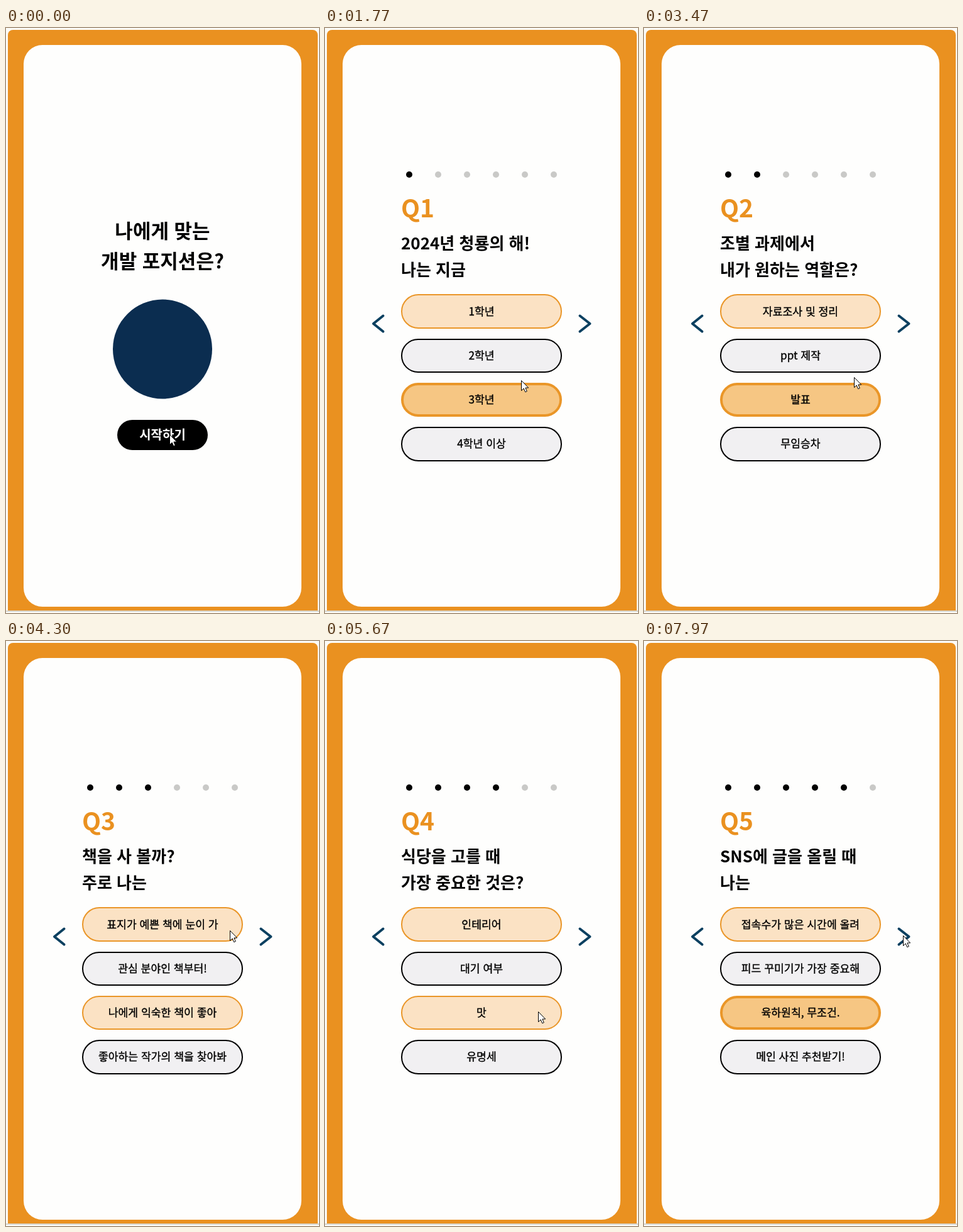
Recreate the animation shown at these times as an HTML page. Size 498 by 930 pixels, loop 8000 ms.

```html
<!DOCTYPE html>
<html lang="ko">
<head>
<meta charset="utf-8">
<title>개발 포지션 테스트</title>
<style>
  html, body { margin: 0; width: 100%; height: 100%; overflow: hidden; background: #fcfcf8; }
  svg { display: block; width: 498px; height: 930px; }
  text { font-family: "Noto Sans CJK KR", "Noto Sans", sans-serif; }
  .mid { text-anchor: middle; }
  .title { font-size: 31px; font-weight: 700; }
  .start { font-size: 20px; font-weight: 700; fill: #fff; }
  .number { font-size: 39px; font-weight: 700; fill: #ea9120; }
  .question { font-size: 26px; font-weight: 700; }
  .label { font-size: 17.2px; stroke: #000; stroke-width: .35px; }
  .arrow { fill: none; stroke: #0c4060; stroke-width: 4; stroke-linecap: round; stroke-linejoin: round; }
</style>
</head>
<body>
<svg viewBox="0 0 498 930">
  <path d="M3 926V11a8 8 0 0 1 8-8H488a8 8 0 0 1 8 8V926Z" fill="#ea9120"/>
  <rect y="926" width="498" height="2" fill="#d6d4cc"/>
  <rect x="28" y="27" width="442" height="893" rx="30" fill="#fefefd"/>
  <g id="intro">
    <text class="title mid" x="249" y="334">나에게 맞는</text>
    <text class="title mid" x="249" y="382">개발 포지션은?</text>
    <circle cx="249" cy="510.5" r="79" fill="#0b2d50"/>
    <rect x="177" y="623" width="144" height="48" rx="24"/>
    <text class="start mid" x="249" y="654">시작하기</text>
  </g>
  <g id="quiz">
    <g id="dots"></g>
    <text id="number" class="number" x="121" y="301"></text>
    <text class="question" x="121" y="352"></text>
    <text class="question" x="121" y="394"></text>
    <g id="options"></g>
    <path class="arrow" d="M92.5 457.5L77 470L92.5 482.5"/>
    <path class="arrow" d="M405.5 457.5L421.5 470L405.5 482.5"/>
  </g>
  <path id="cursor" d="M.5 .5V16.5L4.2 13L6.7 18.7L9.3 17.6L6.9 12H11.7Z" fill="#fff" stroke="#000"/>
</svg>
<script>
const LOOP = 8000;
const LAST_CLICK = 8070;
const PICK_SHARE = 0.48; // part of a page's time before its option is picked
const REST = 100;        // pause of the pointer around each click

// start: when the page appears; pick: chosen option; x: where it is clicked
const pages = [
  { start: 530, pick: 2, x: 275, question: ["2024년 청룡의 해!", "나는 지금"],
    options: ["1학년", "2학년", "3학년", "4학년 이상"] },
  { start: 2370, pick: 2, x: 300, question: ["조별 과제에서", "내가 원하는 역할은?"],
    options: ["자료조사 및 정리", "ppt 제작", "발표", "무임승차"] },
  { start: 3970, pick: 0, x: 313, question: ["책을 사 볼까?", "주로 나는"],
    options: ["표지가 예쁜 책에 눈이 가", "관심 분야인 책부터!", "나에게 익숙한 책이 좋아", "좋아하는 작가의 책을 찾아봐"] },
  { start: 5270, pick: 3, x: 294, question: ["식당을 고를 때", "가장 중요한 것은?"],
    options: ["인테리어", "대기 여부", "맛", "유명세"] },
  { start: 6770, pick: 2, x: 300, question: ["SNS에 글을 올릴 때", "나는"],
    options: ["접속수가 많은 시간에 올려", "피드 꾸미기가 가장 중요해", "육하원칙, 무조건.", "메인 사진 추천받기!"] },
];

const tones = [
  { fill: "#fbe2c4", picked: "#f6c683", stroke: "#ea9628" },
  { fill: "#f1f0f2", picked: "#cfcfcd", stroke: "#000" },
];

const optionTop = i => 423.3 + 70.2 * i;

// Clicks in order: start button, then option and next arrow of every page
const clicks = [{ at: pages[0].start, x: 260, y: 646 }];
pages.forEach((page, i) => {
  const end = i + 1 < pages.length ? pages[i + 1].start : LAST_CLICK;
  page.pickAt = page.start + PICK_SHARE * (end - page.start);
  clicks.push({ at: page.pickAt, x: page.x, y: optionTop(page.pick) + 30 });
  clicks.push({ at: end, x: 412, y: 468 });
});

const byId = id => document.getElementById(id);
const questionLines = document.querySelectorAll(".question");

function setAll(node, attrs) {
  for (const name in attrs) node.setAttribute(name, attrs[name]);
}

function add(parent, tag, attrs = {}) {
  const node = document.createElementNS("http://www.w3.org/2000/svg", tag);
  setAll(node, attrs);
  parent.append(node);
  return node;
}

const dots = Array.from({ length: 6 }, (_, i) =>
  add(byId("dots"), "circle", { cx: 134 + 46 * i, cy: 233, r: 5 }));

const buttons = Array.from({ length: 4 }, (_, i) => ({
  top: Math.round(optionTop(i)),
  bottom: Math.round(optionTop(i) + 54.6),
  box: add(byId("options"), "rect"),
  label: add(byId("options"), "text", { class: "label mid", x: 249, y: optionTop(i) + 33.5 }),
}));

function styleButton({ top, bottom, box }, tone, picked) {
  const line = picked ? 4 : 2;
  const height = bottom - top - line;
  setAll(box, {
    x: 121 + line / 2, y: top + line / 2,
    width: 256 - line, height, rx: height / 2,
    fill: picked ? tone.picked : tone.fill,
    stroke: tone.stroke, "stroke-width": line,
  });
}

function showPage(index, picked) {
  byId("intro").style.display = index < 0 ? "" : "none";
  byId("quiz").style.display = index < 0 ? "none" : "";
  if (index < 0) return;
  const page = pages[index];
  byId("number").textContent = "Q" + (index + 1);
  questionLines.forEach((line, i) => line.textContent = page.question[i]);
  dots.forEach((dot, i) => dot.setAttribute("fill", i <= index ? "#000" : "#c9c9c7"));
  buttons.forEach((button, i) => {
    button.label.textContent = page.options[i];
    styleButton(button, tones[i % 2], picked && i === page.pick);
  });
}

function pointerAt(time) {
  const next = clicks.findIndex(click => click.at > time);
  const to = clicks[next];
  const from = clicks[next - 1] || to;
  const raw = (time - from.at - REST) / (to.at - from.at - 2 * REST);
  const p = Math.min(1, Math.max(0, raw));
  const eased = p * p * (3 - 2 * p);
  return ["x", "y"].map(axis => Math.round(from[axis] + (to[axis] - from[axis]) * eased));
}

let shown = "";
function draw(time) {
  const index = pages.filter(page => time >= page.start).length - 1;
  const picked = index >= 0 && time >= pages[index].pickAt;
  const state = index + ":" + picked;
  if (state !== shown) showPage(index, picked);
  shown = state;
  byId("cursor").setAttribute("transform", `translate(${pointerAt(time)})`);
}

const began = performance.now();
function tick() {
  draw((performance.now() - began) % LOOP);
  requestAnimationFrame(tick);
}
tick();
</script>
</body>
</html>
```
